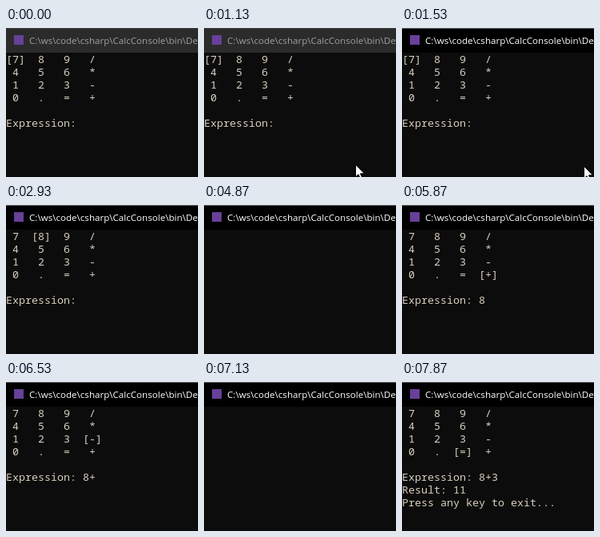
An HTML page for the animation above (9990 ms loop, 240 by 187 pixels).

```html
<!DOCTYPE html>
<html lang="en">
<head>
<meta charset="utf-8">
<title>Console calculator</title>
<style>
html, body { margin: 0; width: 100%; height: 100%; overflow: hidden; background: #0c0c0c; }
#bar {
  position: absolute; left: 0; top: 0; width: 100%; height: 31px;
  box-sizing: border-box; border-top: 1px solid #3c3c3c;
  background: #2b2b2b; color: #a0a0a0; overflow: hidden;
  font: 500 11.6px/30px "Open Sans", "Noto Sans", sans-serif; white-space: nowrap;
}
#bar.active { background: #000; color: #fff; border-color: #565b5e; }
#bar i { position: absolute; left: 10px; top: 8px; width: 12px; height: 12px; background: #68409a; }
#bar span { position: absolute; left: 29px; top: 0; }
#screen {
  position: absolute; left: 0; top: 31px; margin: 0; color: #d8cfbe;
  font: 500 13.333px/16px "Noto Sans Mono", "DejaVu Sans Mono", monospace;
}
#mouse { position: absolute; left: 0; top: 0; width: 13px; height: 20px; overflow: visible; }
</style>
</head>
<body>
<div id="bar"><i></i><span>C:\ws\code\csharp\CalcConsole\bin\De</span></div>
<pre id="screen"></pre>
<svg id="mouse"><path d="M.5 .5V16L4 12.7 6.5 18.5 9 17.5 6.5 11.8H11.5Z" fill="#fff" stroke="#000"/></svg>
<script>
const LOOP = 9990, STEP = 200 / 3, FOCUS = 1400, HIDE = 2200;
const KEYS = ["789/", "456*", "123-", "0.=+"];
const RESULT = "\nResult: 11", EXIT = "\nPress any key to exit...";

// time, selected key (empty = cleared screen), expression, trailing lines
const STATES = [
  [0, "7", ""], [2930, "8", ""], [4070, "8", "8"], [4330, "5", "8"], [4530, "2", "8"],
  [4870, ""], [4930, ".", "8"], [5070, ""], [5130, "=", "8"], [5270, "+", "8"],
  [5470, ""], [5530, "-", "8"], [5800, ""], [5870, "+", "8"],
  [6070, ""], [6130, "+", "8+"], [6470, ""], [6530, "-", "8+"],
  [6730, ""], [6800, "3", "8+"], [7130, ""], [7200, "3", "8+3"],
  [7470, "=", "8+3"], [7800, "=", "8+3", RESULT], [7870, "=", "8+3", RESULT + EXIT]
];

// time, x, y
const PATH = [
  [330, 203, 181], [530, 150, 128], [730, 111, 97], [800, 113, 96],
  [930, 136, 121], [1133, 189, 171], [1267, 222, 172], [1533, 227, 173]
];

const [bar, screen, mouse] = ["bar", "screen", "mouse"].map(id => document.getElementById(id));

function render([, sel, expr, tail = ""]) {
  if (!sel) return "";
  const cell = k => k === sel ? `[${k}] ` : ` ${k}  `;
  const grid = KEYS.map(row => [...row].map(cell).join("")).join("\n");
  return `${grid}\n\nExpression: ${expr}${tail}`;
}

function pointAt(t) {
  const i = PATH.findIndex(p => p[0] > t);
  if (i < 0) return PATH[PATH.length - 1].slice(1);
  const a = PATH[Math.max(i - 1, 0)], b = PATH[i];
  const k = i ? (t - a[0]) / (b[0] - a[0]) : 0;
  return [1, 2].map(n => Math.round(a[n] + (b[n] - a[n]) * k));
}

let shown;
function draw(now) {
  const t = now % LOOP;
  const state = STATES.findLast(s => s[0] <= t);
  if (state !== shown) screen.textContent = render(shown = state);
  bar.className = t >= FOCUS ? "active" : "";
  const [x, y] = pointAt(Math.floor((t + 4) / STEP) * STEP);
  mouse.style.transform = `translate(${x}px, ${y}px)`;
  mouse.style.display = t >= 330 && t < HIDE ? "block" : "none";
}

let start;
function tick(now) {
  start ??= now;
  draw(now - start);
  requestAnimationFrame(tick);
}
draw(0);
requestAnimationFrame(tick);
</script>
</body>
</html>
```
